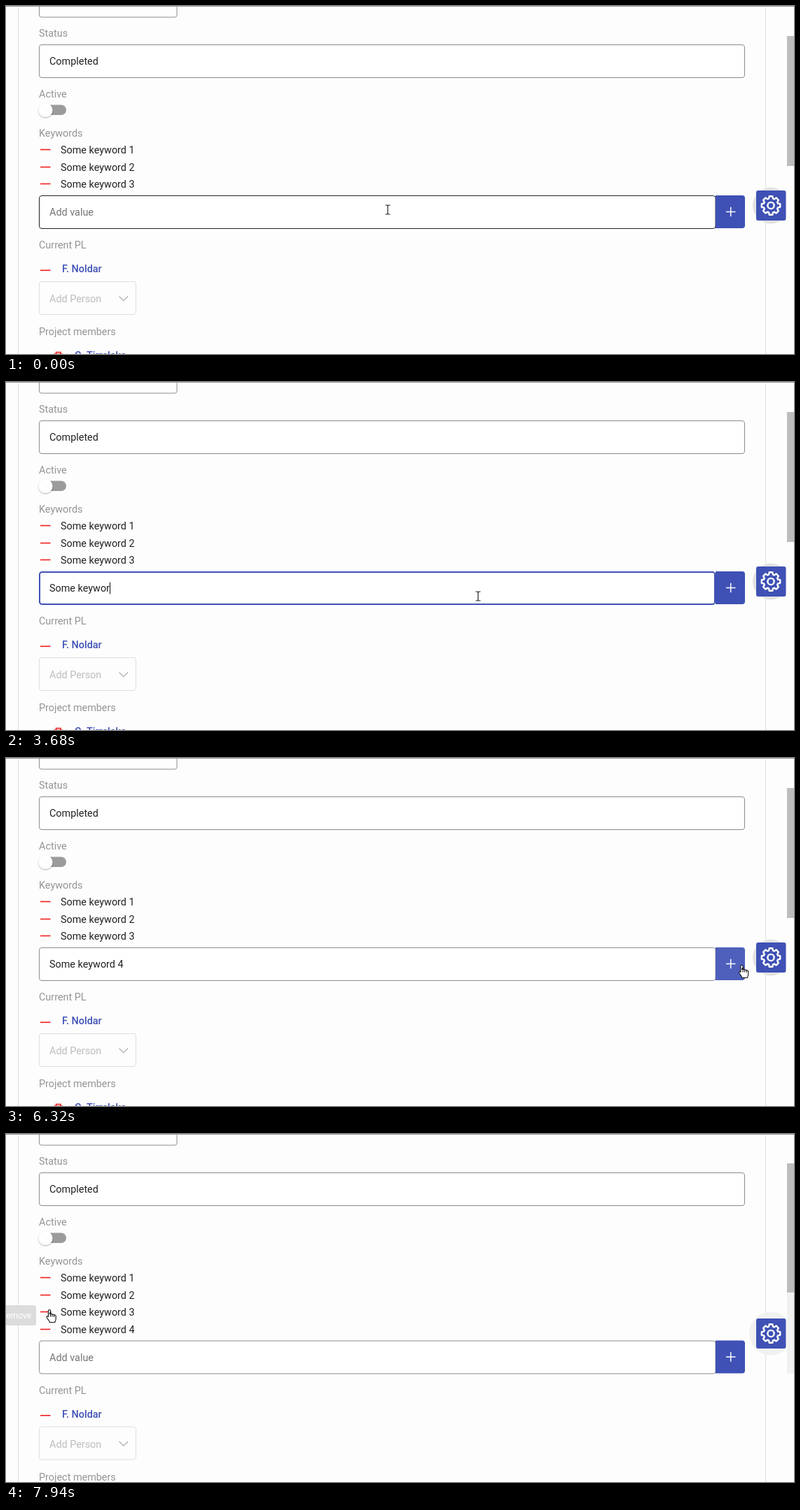
Write an HTML page that moves like this. It is 1125 px wide and 498 px high and loops after 8 s.

```html
<!DOCTYPE html>
<html lang="en">
<head>
<meta charset="utf-8">
<title>Keyword form</title>
<style>
  html, body { margin: 0; width: 100%; height: 100%; overflow: hidden; background: #fdfdfd; }
  svg { display: block; width: 1125px; height: 498px; }
  text { font: 14.4px Roboto, sans-serif; fill: #212121; white-space: pre; }
  .label { fill: #949494; }
  .name { font-weight: 500; fill: #3f51b5; }
  .faint { fill: #bdbdbd; }
  .box { fill: #fff; stroke: #8c8c8c; }
  .red { fill: none; stroke: #f01c1c; stroke-width: 1.6; }
  .white { fill: none; stroke: #fff; }
  .blue { fill: #3f51b5; }
</style>
</head>
<body>
<svg viewBox="0 0 1125 498">
  <defs>
    <clipPath id="haloClip"><rect x="1050" y="240" width="63" height="90"/></clipPath>
    <filter id="shadow" x="-50%" y="-50%" width="200%" height="200%">
      <feDropShadow dx="0" dy="1" stdDeviation="1.2" flood-opacity=".35"/>
    </filter>
    <g id="ibeam">
      <path d="M-3.5-6.5h2.5l1 1 1-1h2.5M-3.5 6.5h2.5l1-1 1 1h2.5M0-5.5v11" fill="none" stroke="#222" stroke-width="1.2"/>
    </g>
    <g id="hand" fill="#fff" stroke="#111" stroke-width="1.1" stroke-linejoin="round">
      <path d="M-1.6 10V1.5Q-1.6 0 0 0t1.6 1.5V6.2Q3-.0 0 5.8Q3 5 4 6.7Q6 6 6.7 7.5Q9 7 9.2 9v4Q9 15.500 7.800 18H.5Q-.5 15-3.500 11.800Q-4.500 10-3.300 9.300Q-2.300 9-1.600 10Z"/>
      <path d="M1.600 6v4M4 6.700V10M6.700 7.500V10.500" fill="none"/>
    </g>
    <path id="arrow" d="M0 0V16L3.700 12.500 6.200 18 8.600 17 6.200 11.500H11.300Z" fill="#fff" stroke="#111"/>
  </defs>

  <path d="M17.500 0V498M1084.500 0V498" stroke="#e0e0e0"/>
  <path d="M0 .5H1125" stroke="#999"/>
  <path class="box" d="M47.500 1V13q0 3 3 3H241q3 0 3-3V1"/>
  <text class="label" x="47" y="44">Status</text>
  <rect class="box" x="47.500" y="55.500" width="1007" height="47" rx="3.500"/>
  <text x="62" y="84">Completed</text>
  <text class="label" x="47" y="131">Active</text>
  <rect x="52" y="141.500" width="34" height="14.500" rx="7.200" fill="#9b9b9b"/>
  <circle cx="56.500" cy="149" r="10" fill="#fff" filter="url(#shadow)"/>
  <text class="label" x="47" y="187">Keywords</text>
  <g id="keywords"></g>

  <g id="lower">
    <rect id="field" class="box" rx="3.500"/>
    <text id="typed" x="62" y="300"></text>
    <path id="caret" stroke="#111"/>
    <path id="add" class="blue" d="M1013 271H1051q4 0 4 4V314q0 4-4 4H1013Z"/>
    <path class="white" stroke-width="1.500" d="M1028 294.500h13.500M1034.700 287.700v13.500"/>
    <text class="label" x="47" y="347">Current PL</text>
    <path class="red" d="M49 378.300H63.500"/>
    <text class="name" x="80" y="381">F. Noldar</text>
    <g id="person">
      <rect x="47.500" y="394.500" width="138" height="47" rx="3.500" fill="#fdfdfd" stroke="#dedede"/>
      <text class="faint" x="62" y="424">Add Person</text>
      <path d="M161.500 415.500l6.300 6.300 6.300-6.300" fill="none" stroke="#b5b5b5" stroke-width="1.500"/>
    </g>
    <g id="members">
      <text class="label" x="47" y="471">Project members</text>
      <path class="red" d="M49 502.300H63.500"/>
      <path class="red" stroke-width="1.300" d="M68 498.300H81.500M71.500 498V495.500H78V498M69.500 498.500V508q0 1.500 1.500 1.500h7.500q1.500 0 1.500-1.500V498.500M73 501.500v5M76.500 501.500v5"/>
      <text class="name" x="98" y="505">G. Tirrelaks</text>
    </g>
  </g>

  <rect id="track" x="1115" y="228" width="10" height="115" fill="#f1f1f1"/>
  <rect id="thumb" x="1115" width="10" fill="#bdbdbd"/>
  <circle id="halo" cx="1092" cy="285.500" clip-path="url(#haloClip)"/>
  <rect class="blue" x="1071" y="264" width="42.500" height="43" rx="3"/>
  <path id="gear" class="white" stroke-width="2.400" stroke-linejoin="round"/>
  <circle class="white" cx="1092" cy="285.500" r="4.600" stroke-width="2.400"/>

  <g id="tooltip">
    <rect x="-20" y="245" width="63" height="29" rx="3.500" fill="#dcdcdc"/>
    <text x="36" y="264" text-anchor="end" style="font-size:12px;fill:#fff">Remove</text>
  </g>
  <use id="mouse"/>
</svg>

<script>
const LOOP = 8000, ROW = 24.5, ADDED = 6470, RELOADED = 6880;
const $ = id => document.getElementById(id);
const set = (id, attrs) => {
  for (const key in attrs) $(id).setAttribute(key, attrs[key]);
};
const show = (id, on) => { $(id).style.display = on ? "" : "none"; };
const latest = (steps, t) => steps.findLast(step => step[0] <= t);

// time, field text, caret visible
const typing = [
  [0, "", false], [930, "", true], [1350, "", false],
  [1610, "S", true], [2010, "So", true], [2440, "S", true],
  [2575, "Som", true], [2710, "Some", true],
  [2990, "Some k", true], [3115, "Some ke", true], [3240, "Some key", true],
  [3530, "Some keywo", true], [3680, "Some keywor", true],
  [3960, "Some keyword", true], [4110, "Some keyword ", true],
  [4400, "Some keyword 5", true], [4990, "Some keyword 5", false],
  [5110, "Some keyword 4", true], [5640, "Some keyword 4", false],
  [6170, "Some keyword 4", true], [6320, "Some keyword 4", false],
  [ADDED, "", false]
];

// time, cursor shape, x, y
const pointer = [
  [0, "ibeam", 545, 291.5], [250, "ibeam", 539.5, 295.5], [780, "ibeam", 674, 306.5],
  [5510, "ibeam", 735, 306], [5640, "ibeam", 880, 306], [5770, "ibeam", 1003, 306],
  [5900, "hand", 1050.5, 296.5], [7010, "arrow", 1020, 288], [7140, "arrow", 860, 280],
  [7270, "arrow", 610, 272], [7400, "arrow", 360, 264], [7540, "arrow", 190, 258],
  [7670, "ibeam", 107, 260], [7820, "hand", 62, 251.5]
];

$("keywords").innerHTML = [1, 2, 3, 4].map((n, i) => {
  const y = Math.round(211 + i * ROW);
  return `<g id="keyword${n}"><path class="red" d="M49 ${y - 5.5}H63.500"/>
    <text x="78" y="${y}">Some keyword ${n}</text></g>`;
}).join("");

const gearPoint = (radius, angle) =>
  `${1092 + radius * Math.cos(angle)},${285.5 + radius * Math.sin(angle)}`;
const gearPoints = [];
for (let tooth = 0; tooth < 8; tooth++) {
  const middle = tooth * Math.PI / 4;
  for (const [radius, offset] of [[10.4, -.29], [13.4, -.17], [13.4, .17], [10.4, .29]])
    gearPoints.push(gearPoint(radius, middle + offset));
}
set("gear", { d: `M${gearPoints.join("L")}Z` });

function drawField(t) {
  const focused = t >= 930 && t < 6320;
  const [, value, caret] = latest(typing, t);
  const inset = focused ? 1 : .5;
  set("field", {
    x: 47 + inset, y: 271 + inset, width: 966 - 2 * inset + (focused ? 0 : .5), height: 48 - 2 * inset
  });
  $("field").style.stroke = focused ? "#3f51b5" : t < 930 ? "#222" : "";
  $("field").style.strokeWidth = focused ? 2 : 1;

  $("typed").textContent = value || "Add value";
  $("typed").style.fill = value ? "" : "#757575";
  const caretX = Math.round(62 + (value ? $("typed").getComputedTextLength() : 0)) + .5;
  set("caret", { d: `M${caretX} 286.500V303.500` });
  show("caret", caret);
  $("add").style.fill = t < 5900 || t >= RELOADED ? "" : t < 6750 ? "#4f60bc" : "#4757b8";
}

function draw(t) {
  const added = t >= ADDED;
  const reloading = added && t < RELOADED;
  const settled = t >= RELOADED;
  drawField(t);

  show("keyword4", added);
  set("lower", { transform: `translate(0 ${added ? ROW : 0})` });
  show("person", !reloading);
  set("members", { transform: `translate(0 ${reloading ? -47.5 : 0})` });

  const [top, bottom] = reloading ? [47, 237] : settled ? [42, 227] : [43, 229];
  set("thumb", { y: top, height: bottom - top });
  show("track", settled);
  set("halo", { r: settled ? 31 : 26, fill: settled ? "#f1f1f1" : "#e2e2e2" });

  const [, shape, x, y] = latest(pointer, t);
  set("mouse", { href: "#" + shape, x, y });
  show("tooltip", t >= 7940);
}

const start = performance.now();
function frame() {
  draw((performance.now() - start) % LOOP);
  requestAnimationFrame(frame);
}
frame();
</script>
</body>
</html>
```
